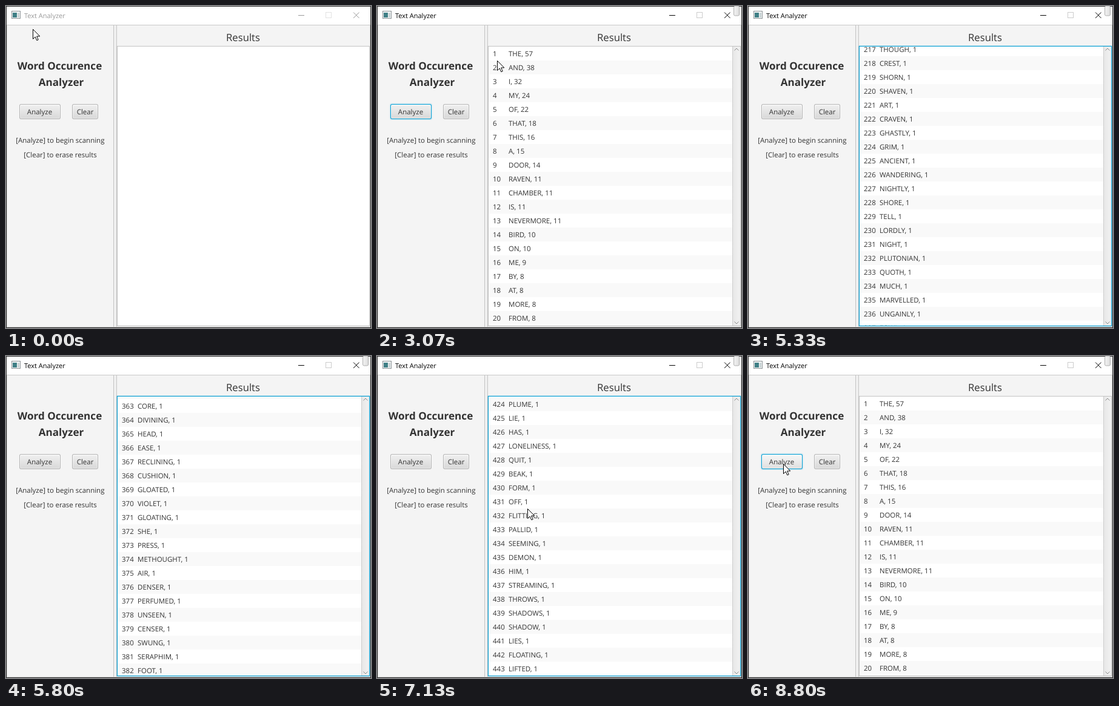
Write an HTML page that moves like this. It is 602 by 532 pixels and loops after 9390 ms.

```html
<!DOCTYPE html>
<html lang="en">
<head>
<meta charset="utf-8">
<title>Text Analyzer</title>
<style>
  html, body { margin: 0; width: 100%; height: 100%; overflow: hidden; background: #f4f4f4; }
  svg { display: block; width: 602px; height: 532px; }
  text { font: 11.5px "Open Sans", "Noto Sans", sans-serif; fill: #333; text-rendering: geometricPrecision; white-space: pre; }
  .mid { text-anchor: middle; }
  .head { font-size: 17.1px; font-weight: 700; }
  .results { font-size: 16.7px; }
  .title { font-size: 11px; fill: #999; }
  .ctl { fill: none; stroke: #999; }
  .max { fill: none; stroke: #e2e2e2; }
  .active .title { fill: #000; }
  .active .ctl { stroke: #000; }
  .active .max { stroke: #ccc; }

  .glow { fill: none; }
  .edge { fill: #b4b4b4; }
  .rim { fill: url(#rim); }
  .body { fill: url(#body); }
  .hover .body { fill: url(#hover); }
  .armed .body { fill: url(#armed); }
  .focus .glow { fill: #039ed3; fill-opacity: .14; }
  .focus .edge { fill: #039ed3; }

  .frame { fill: #fff; stroke: #c4c4c4; }
  .frame.focus { stroke: #039ed3; stroke-width: 1.4; }
  .cell { fill: #fff; }
  .odd .cell { fill: #f9f9f9; }
  .sel .cell { fill: #0096c9; }
  .cell-rim { fill: none; }
  .sel .cell-rim { stroke: #3bb1da; }
  .sel text { fill: #fff; }
  .chev { fill: none; stroke: #8c8c8c; }
  .thumb { fill: url(#thumb); stroke: #b0b0b0; }
  .thumb.held { fill: #dcdcdc; }
</style>
</head>
<body>
<svg id="win" viewBox="0 0 602 532">
  <defs>
    <linearGradient id="rim" x2="0" y2="1"><stop stop-color="#fdfdfd"/><stop offset="1" stop-color="#e6e6e6"/></linearGradient>
    <linearGradient id="body" x2="0" y2="1"><stop stop-color="#efefef"/><stop offset="1" stop-color="#d9d9d9"/></linearGradient>
    <linearGradient id="hover" x2="0" y2="1"><stop stop-color="#f6f6f6"/><stop offset="1" stop-color="#e0e0e0"/></linearGradient>
    <linearGradient id="armed" x2="0" y2="1"><stop stop-color="#e2e2e2"/><stop offset="1" stop-color="#cdcdcd"/></linearGradient>
    <linearGradient id="thumb"><stop stop-color="#f2f2f2"/><stop offset="1" stop-color="#dedede"/></linearGradient>
    <linearGradient id="track"><stop stop-color="#e6e6e6"/><stop offset="1" stop-color="#f2f2f2"/></linearGradient>
    <clipPath id="view"><rect x="184" y="67" width="402" height="461"/></clipPath>
  </defs>

  <rect width="602" height="532" fill="#2b2b2b"/>
  <rect x="1" y="1" width="600" height="30" fill="#fff"/>
  <rect x="1.5" y="31.5" width="599" height="499" fill="#f4f4f4" stroke="#c8c8c8"/>

  <rect x="9.5" y="8.5" width="14" height="12" fill="#f4f6f6" stroke="#8b9296"/>
  <rect x="11" y="11" width="7" height="8" fill="#3f7f86"/>
  <rect x="19" y="11" width="3" height="8" fill="#c9d3d5"/>
  <text class="title" x="30" y="20">Text Analyzer</text>
  <path class="ctl" d="M482 15.5h10"/>
  <rect class="max" x="527.5" y="10.5" width="9" height="9"/>
  <path class="ctl" d="M573 10.5l9.5 9.5m0-9.5l-9.5 9.5"/>

  <text class="mid head" x="88.5" y="105">Word Occurence</text>
  <text class="mid head" x="91" y="132">Analyzer</text>
  <g id="analyze"></g>
  <g id="clear"></g>
  <text class="mid" x="89.3" y="226">[Analyze] to begin scanning</text>
  <text class="mid" x="89.5" y="250">[Clear] to erase results</text>

  <rect x="178" y="32" width="4" height="498" fill="#f0f0f0"/>
  <path d="M177.5 32v498M182.5 32v498" stroke="#c4c4c4"/>
  <text class="mid results" x="391" y="58">Results</text>
  <rect id="frame" class="frame" x="183.5" y="66.5" width="416" height="462"/>

  <g id="list">
    <g id="rows" clip-path="url(#view)"></g>
    <rect x="586" y="67" width="13" height="461" fill="url(#track)"/>
    <path d="M586.5 67v461" stroke="#cdcdcd"/>
    <path class="chev" d="M589.5 73.5l3.5-3.5 3.5 3.5M589.5 521.5l3.5 3.5 3.5-3.5"/>
    <rect id="thumb" class="thumb" x="588.5" width="9" height="16" rx="2"/>
  </g>

  <path id="cursor" d="M.5 .5V16.5L4.2 13 6.8 18.8 9.2 17.8 6.7 12H11.8Z" fill="#fff" stroke="#000"/>
</svg>

<script>
const LOOP = 9390, TICK = 200 / 3;
const ROW = 23, TOP = 67, VIEW = 461, TOTAL = 443;

const head = `THE 57 AND 38 I 32 MY 24 OF 22 THAT 18 THIS 16 A 15 DOOR 14 RAVEN 11 CHAMBER 11 IS 11
NEVERMORE 11 BIRD 10 ON 10 ME 9 BY 8 AT 8 MORE 8 FROM 8`.split(/\s+/);

const middle = `IN IT LENORE NOTHING WITH TO BUT SOUL WHAT HEART AS NOT THEN STILL NO YET PROPHET THY HIS SO
ITS THERE TAPPING SAID FOR WAS OR HAVE SOME THOU WHOM SHALL BE HEARD ONCE UPON MIDNIGHT DREARY WHILE PONDERED
WEAK WEARY OVER MANY QUAINT CURIOUS VOLUME FORGOTTEN LORE NODDED NEARLY NAPPING SUDDENLY CAME GENTLY RAPPING
VISITOR MUTTERED ONLY AH DISTINCTLY REMEMBER BLEAK DECEMBER EACH SEPARATE DYING EMBER WROUGHT GHOST EAGERLY
WISHED MORROW VAINLY SOUGHT BORROW BOOKS SURCEASE SORROW LOST RARE RADIANT MAIDEN NAME NAMELESS EVERMORE
SILKEN SAD UNCERTAIN RUSTLING PURPLE CURTAIN THRILLED FILLED FANTASTIC TERRORS NEVER FELT BEFORE NOW BEATING
STOOD REPEATING ENTREATING ENTRANCE LATE PRESENTLY GREW STRONGER HESITATING LONGER MADAM FORGIVENESS FACT
FAINTLY SCARCE SURE OPENED WIDE DARKNESS DEEP PEERING LONG WONDERING FEARING DOUBTING DREAMING DREAMS MORTAL
EVER DARED DREAM SILENCE UNBROKEN STILLNESS GAVE SPOKEN WORD WHISPERED ECHO MURMURED BACK MERELY INTO TURNING
ALL WITHIN BURNING SOON AGAIN SOMEWHAT LOUDER SURELY SOMETHING WINDOW LATTICE LET SEE THEREAT MYSTERY EXPLORE
MOMENT WIND OPEN FLUNG SHUTTER FLIRT FLUTTER STEPPED STATELY DAYS YORE LEAST OBEISANCE MADE MINUTE STOPPED
STAYED MIEN LORD LADY PERCHED ABOVE BUST PALLAS JUST SAT EBONY BEGUILING FANCY SMILING GRAVE STERN DECORUM
COUNTENANCE WORE THOUGH CREST SHORN SHAVEN ART CRAVEN GHASTLY GRIM ANCIENT WANDERING NIGHTLY SHORE TELL LORDLY
NIGHT PLUTONIAN QUOTH MUCH MARVELLED UNGAINLY FOWL HEAR DISCOURSE PLAINLY ANSWER LITTLE MEANING RELEVANCY BORE
CANNOT HELP AGREEING LIVING HUMAN BEING BLESSED SEEING BEAST SCULPTURED SUCH SITTING LONELY PLACID SPOKE ONE
OUTPOUR FARTHER UTTERED FEATHER FLUTTERED TILL FRIENDS FLOWN LEAVE HOPES STARTLED REPLY APTLY DOUBTLESS UTTERS
STOCK STORE CAUGHT UNHAPPY MASTER UNMERCIFUL DISASTER FOLLOWED FAST FASTER SONGS BURDEN DIRGES HOPE MELANCHOLY
STRAIGHT WHEELED CUSHIONED SEAT FRONT VELVET SINKING BETOOK LINKING OMINOUS GAUNT CROAKING ENGAGED GUESSING
SYLLABLE EXPRESSING WHOSE FIERY EYES BURNED`.split(/\s+/);

const tail = `CORE DIVINING HEAD EASE RECLINING CUSHION GLOATED VIOLET GLOATING SHE PRESS METHOUGHT AIR DENSER
PERFUMED UNSEEN CENSER SWUNG SERAPHIM FOOT TINKLED TUFTED WRETCH GOD LENT HATH THEE ANGELS SENT RESPITE NEPENTHE
MEMORIES QUAFF KIND FORGET DEVIL TEMPTER TEMPEST TOSSED ASHORE DESOLATE UNDAUNTED DESERT ENCHANTED HORROR HAUNTED
TRULY IMPLORE BALM GILEAD BENDS LADEN DISTANT AIDENN CLASP SAINTED SIGN FIEND SHRIEKED UPSTARTING TOKEN PLUME LIE
HAS LONELINESS QUIT BEAK FORM OFF FLITTING PALLID SEEMING DEMON HIM STREAMING THROWS SHADOWS SHADOW LIES FLOATING
LIFTED`.split(/\s+/);

// last rank that still has 8, 7, ... 2 occurrences
const lastRank = [22, 28, 36, 48, 70, 105, 185];

function entry(n) {
  if (n <= 20) return head[2 * n - 2] + ', ' + head[2 * n - 1];
  const k = lastRank.findIndex(r => n <= r);
  const start = TOTAL - tail.length;
  const word = n > start ? tail[n - start - 1] : middle[(n - 21) % middle.length];
  return word + ', ' + (k < 0 ? 1 : 8 - k);
}

const $ = id => document.getElementById(id);

function button(id, x, w, label, cx) {
  const layer = (name, d, r) =>
    `<rect class="${name}" x="${x + d}" y="${162 + d}" width="${w - 2 * d}" height="${25 - 2 * d}" rx="${r}"/>`;
  $(id).innerHTML = layer('glow', -1.4, 4) + layer('edge', 0, 3) + layer('rim', 1, 2) + layer('body', 2, 1.5) +
    `<text class="mid" x="${cx}" y="179">${label}</text>`;
}
button('analyze', 22, 68, 'Analyze', 55.5);
button('clear', 109, 43, 'Clear', 130.5);

$('rows').innerHTML = `<g><rect class="cell" width="402" height="23"/>
  <rect class="cell-rim" x="1.5" y="1.5" width="399" height="20"/>
  <text x="7" y="16"></text><text x="33" y="16"></text></g>`.repeat(22);
const rows = [...$('rows').children];

// key points: tick, then values
const path = [
  [0, 44, 38], [4, 60, 168], [19, 60, 168], [24, 92, 175], [29, 131, 168], [30, 131, 168], [36, 60, 172],
  [41, 60, 172], [46, 198, 90], [50, 232, 76], [51, 232, 76], [55, 236, 99], [59, 240, 122], [61, 242, 122],
  [68, 569, 88], [70, 592, 86], [71, 592, 88], [74, 594, 130], [80, 603, 303], [81, 612, 330], [100, 612, 480],
  [101, 560, 468], [107, 248, 252], [112, 152, 184], [114, 139, 176], [115, 140, 176], [120, 140, 176], [126, 58, 178]
];
const scroll = [[71, 0], [74, .1], [81, .58], [87, .8555], [92, .97], [95, 1]];

function at(keys, k) {
  const i = keys.findIndex(p => p[0] > k);
  if (i < 0) return keys[keys.length - 1].slice(1);
  if (i === 0) return keys[0].slice(1);
  const a = keys[i - 1], b = keys[i], u = (k - a[0]) / (b[0] - a[0]);
  return a.slice(1).map((v, j) => v + (b[j + 1] - v) * u);
}

const within = (k, ...spans) => spans.some(([a, b]) => k >= a && k < b);
const toggle = (id, name, on) => $(id).classList.toggle(name, on);

function draw(k) {
  const [x, y] = at(path, k);
  const mx = Math.round(x), my = Math.round(y);
  const over = (l, r) => mx >= l && mx < r && my >= 162 && my < 187;
  $('cursor').setAttribute('transform', `translate(${mx} ${my})`);
  $('cursor').style.display = within(k, [81, 101]) ? 'none' : '';

  toggle('win', 'active', k >= 13);
  toggle('analyze', 'focus', within(k, [13, 29], [41, 50], [131, 999]));
  toggle('analyze', 'armed', within(k, [13, 14], [41, 42], [131, 132]));
  toggle('analyze', 'hover', over(22, 90));
  toggle('clear', 'focus', within(k, [29, 41], [119, 131]));
  toggle('clear', 'armed', within(k, [29, 31], [119, 121]));
  toggle('clear', 'hover', over(109, 152));
  toggle('frame', 'focus', within(k, [50, 119]));

  const shown = within(k, [14, 31], [42, 121], [132, 999]);
  $('list').style.display = shown ? '' : 'none';
  if (!shown) return;

  const part = k < 121 ? at(scroll, k)[0] : 0;
  const off = Math.round(part * (TOTAL * ROW - VIEW));
  const first = Math.floor(off / ROW);
  const picked = !within(k, [50, 121]) ? 0 : k < 55 ? 1 : k < 59 ? 2 : 3;
  rows.forEach((g, i) => {
    const n = first + i + 1;
    g.style.display = n > TOTAL ? 'none' : '';
    if (n > TOTAL) return;
    g.setAttribute('transform', `translate(184 ${TOP + i * ROW - off % ROW})`);
    g.classList.toggle('odd', n % 2 === 0);
    g.classList.toggle('sel', n === picked);
    g.children[2].textContent = n;
    g.children[3].textContent = entry(n);
  });
  $('thumb').setAttribute('y', 78.5 + Math.round(part * 422));
  toggle('thumb', 'held', within(k, [71, 101]));
}

const t0 = performance.now();
let last = -1;
function step() {
  const t = (performance.now() - t0) % LOOP;
  const k = Math.floor((t + 4) / TICK);
  if (k !== last) draw(last = k);
  requestAnimationFrame(step);
}
step();
</script>
</body>
</html>
```
